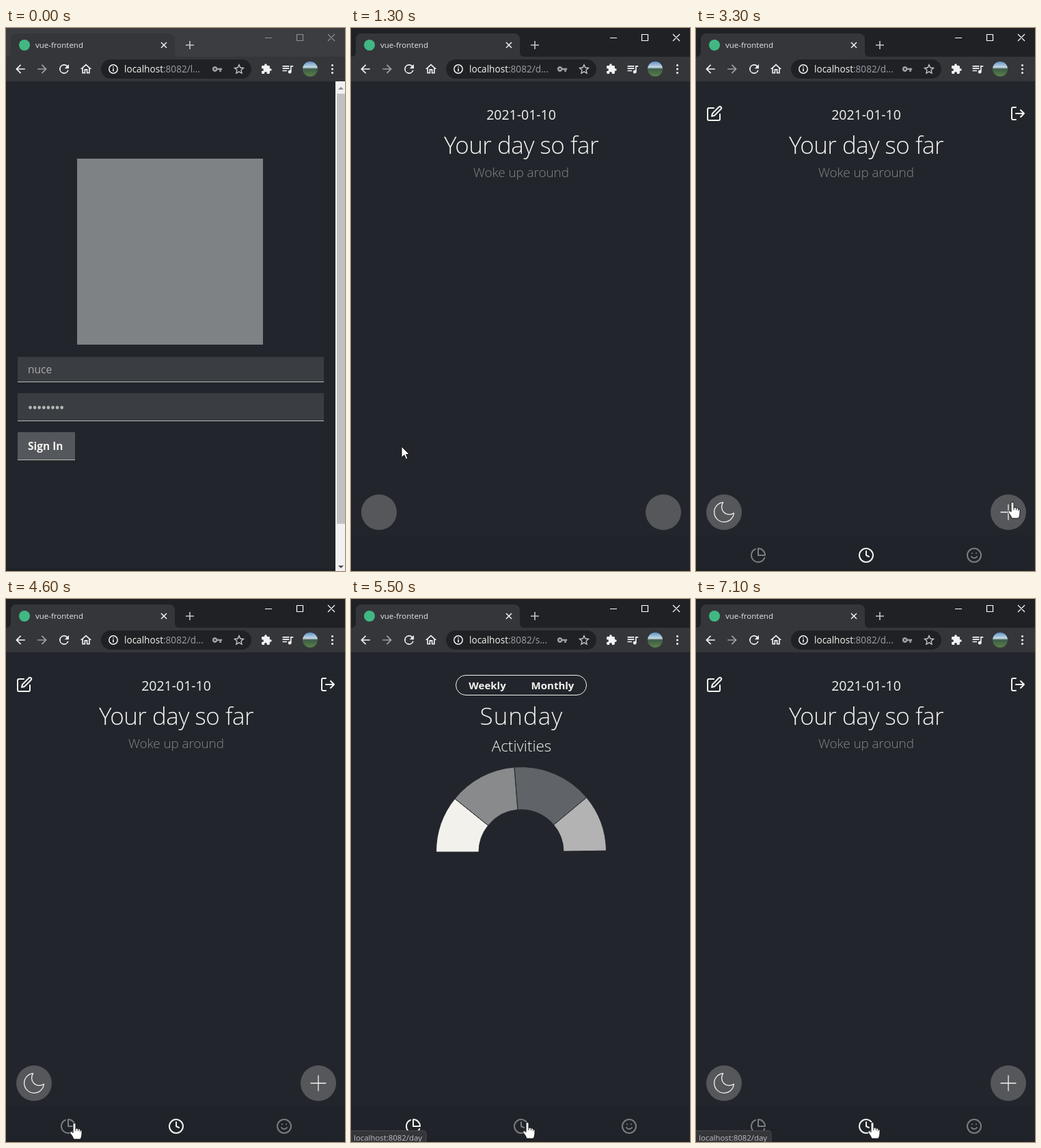
Animation, 496 px wide and 794 px high, one loop 7.2 s. Source, as an HTML page:

```html
<!DOCTYPE html>
<html lang="en">
<head>
<meta charset="utf-8">
<title>vue-frontend</title>
<style>
  html, body { margin: 0; width: 100%; height: 100%; overflow: hidden; background: #22262c; }
  svg { display: block; width: 496px; height: 794px; }
  text { font-family: "Open Sans", "Noto Sans", sans-serif; fill: #f4f4f0; white-space: pre; }
  .mid { text-anchor: middle; }
  .light { font-weight: 300; }
  .bold { font-weight: 700; }
  .line { fill: none; stroke: #f4f4f0; stroke-width: 2; stroke-linecap: round; stroke-linejoin: round; }
  .dim { stroke: #7b7d80; }
  .glyph { fill: #f1f3f4; fill-rule: evenodd; }
  .soft { fill: #9aa0a6; }
  .thin { fill: none; stroke: #f1f3f4; stroke-width: 1.2; }
</style>
</head>
<body>
<svg viewBox="0 0 496 794">
  <defs>
    <linearGradient id="photo" x1="0" y1="0" x2="0" y2="1">
      <stop offset="0" stop-color="#5f93c8"/>
      <stop offset=".38" stop-color="#c4d8e4"/>
      <stop offset=".5" stop-color="#3d5c48"/>
      <stop offset="1" stop-color="#5b8148"/>
    </linearGradient>
  </defs>
  <rect width="496" height="794" fill="#22262c"/>

  <g id="login">
    <rect x="104" y="191" width="272" height="272" fill="#7f8284"/>
    <g fill="#3a3d42">
      <rect x="17" y="481" width="448" height="37"/>
      <rect x="17" y="534" width="448" height="41"/>
    </g>
    <rect x="17" y="591" width="84" height="41" fill="#54575b"/>
    <path d="M17 517.5H465M17 574.5H465M17 631.5H101" stroke="#b9bab6"/>
    <text x="32" y="505" font-size="15.5" style="fill:#abacab">nuce</text>
    <g id="dots" fill="#b4b5b4"></g>
    <text class="bold" x="32" y="617" font-size="15.5">Sign In</text>
    <rect x="482" y="78" width="14" height="716" fill="#f1f1f1"/>
    <rect x="484" y="96" width="12" height="629" fill="#c1c1c1"/>
    <path d="M486 90l4-4 4 4z" fill="#8b8b8b"/>
    <path d="M486 786l4 4 4-4z" fill="#505050"/>
  </g>

  <rect id="footer" y="741" width="496" height="53" fill="#20242a"/>

  <g id="day">
    <text class="mid" x="249" y="134" font-size="19.5">2021-01-10</text>
    <text class="mid light" x="249" y="184" font-size="35" letter-spacing="-.5">Your day so far</text>
    <text class="mid light" x="249" y="218" font-size="19" letter-spacing="-.1" style="fill:#85878a">Woke up around</text>
    <circle cx="41" cy="708" r="26" fill="#55575b"/>
    <circle cx="457" cy="708" r="26" fill="#55575b"/>
    <g id="dayIcons" class="line">
      <path transform="translate(15 113)" d="M11 4H4a2 2 0 0 0-2 2v14a2 2 0 0 0 2 2h14a2 2 0 0 0 2-2v-7M18.5 2.5a2.12 2.12 0 0 1 3 3L12 15l-4 1 1-4z"/>
      <path transform="translate(459 113)" d="M9 21H5a2 2 0 0 1-2-2V5a2 2 0 0 1 2-2h4M16 17l5-5-5-5M21 12H9"/>
      <path transform="translate(21.8 688.8) scale(1.6)" stroke-width=".8" style="stroke-width:.8" d="M21 12.79A9 9 0 1 1 11.21 3 7 7 0 0 0 21 12.79z"/>
      <path style="stroke-width:1.3" d="M446 708H468M457 697V719"/>
    </g>
  </g>

  <g id="stats">
    <rect x="153.5" y="111.5" width="191" height="29" rx="14.5" fill="none" stroke="#f4f4f0"/>
    <text class="mid bold" x="199.5" y="132" font-size="15">Weekly</text>
    <text class="mid bold" x="295" y="132" font-size="15">Monthly</text>
    <text class="mid light" x="249.5" y="184" font-size="35" letter-spacing="1">Sunday</text>
    <text class="mid light" x="249.5" y="223" font-size="22.5">Activities</text>
    <g id="chart" stroke="#22262c"></g>
  </g>

  <g id="nav">
    <path id="pieIcon" class="line" transform="translate(79 759)" d="M21.21 15.89A10 10 0 1 1 8 2.83M22 12A10 10 0 0 0 12 2v10z"/>
    <path id="clockIcon" class="line" transform="translate(237 759)" d="M22 12a10 10 0 1 1-20 0 10 10 0 0 1 20 0zM12 6v6l4 2"/>
    <path class="line dim" transform="translate(395 759)" d="M22 12a10 10 0 1 1-20 0 10 10 0 0 1 20 0zM8 14s1.5 2 4 2 4-2 4-2M9 9h.01M15 9h.01"/>
  </g>
  <rect id="edge" y="790" width="482" height="4" fill="#1e2126"/>

  <g id="status">
    <path d="M-1 795V777.5H106a4 4 0 0 1 4 4V795z" fill="#35363a" stroke="#47484c"/>
    <text x="4" y="792" font-size="11.4" style="fill:#bcbfc2">localhost:8082/day</text>
  </g>

  <g id="browser">
    <rect id="titleBar" width="496" height="43"/>
    <path d="M0 42H1a6 6 0 0 0 6-6V16a8 8 0 0 1 8-8H239a8 8 0 0 1 8 8V36a6 6 0 0 0 6 6H496V78H0z" fill="#35363a"/>
    <circle cx="27" cy="25" r="8" fill="#41b883"/>
    <text x="43" y="29" font-size="11.5" style="fill:#e3e5e8">vue-frontend</text>
    <path class="thin" style="stroke-width:1.5" d="M227 21l8 8M235 21l-8 8"/>
    <path class="thin" style="stroke-width:1.6;stroke:#c4c7ca" d="M263 25H275M269 19V31"/>
    <path id="controls" class="thin" d="M379 14.5H389M425.5 9.5H434.5V18.5H425.5zM471 9l10 10M481 9l-10 10"/>
    <rect x="139" y="46" width="220" height="28" rx="14" fill="#202124"/>
    <circle class="thin" style="stroke-width:1.5" cx="157" cy="60" r="6.2"/>
    <path class="thin" style="stroke-width:1.6" d="M157 59V63.5M157 56.2V57.8"/>
    <text x="173" y="65" font-size="13.6">localhost<tspan id="tail" fill="#9aa0a6" style="fill:#9aa0a6"></tspan></text>
    <path class="thin" style="stroke:#c3c6c9;stroke-width:1.4" d="M341 53.8l1.9 4.2 4.6.5-3.4 3.1.9 4.5-4-2.3-4 2.3.9-4.5-3.4-3.1 4.6-.5z"/>
    <circle cx="445" cy="60" r="11" fill="url(#photo)"/>
    <path d="M477.5 54.5h.01M477.5 60h.01M477.5 65.5h.01" stroke="#f1f3f4" stroke-width="3.2" stroke-linecap="round"/>
  </g>

  <g id="cursor" fill="#fff" stroke="#111" stroke-linejoin="round">
    <path id="arrow" d="M0 0V16L4 12.5 6.5 18.5 9 17.5 6.5 11.5H11.5z"/>
    <g id="hand">
      <path d="M-2 1Q0-1 2 1V8.5Q4 7 5.5 9Q7.5 8 8.5 10Q11 10 11 12.5V17Q11 20 9 24H-1Q-2 20-6 15.5Q-7 13-5 12.5Q-3.5 12.5-2 14.5z"/>
      <path d="M2 8V12M5.5 9V12M8.5 10V13" fill="none" stroke-width=".9"/>
    </g>
  </g>
</svg>
<script>
const LOOP = 7200, STEP = 100;
const $ = id => document.getElementById(id);
const show = (id, on) => { $(id).style.display = on ? "" : "none"; };

function add(parent, tag, attrs) {
  const el = document.createElementNS("http://www.w3.org/2000/svg", tag);
  for (const name in attrs) el.setAttribute(name, attrs[name]);
  return parent.appendChild(el);
}

// Toolbar glyphs on a 24-unit grid: centre x, scale, class, outline
const arrowPath = "M20 11H7.8l5.6-5.6L12 4l-8 8 8 8 1.4-1.4L7.8 13H20z";
[
  [21, .85, "glyph", arrowPath],
  [53, -.85, "glyph soft", arrowPath],
  [85, .87, "glyph", "M17.65 6.35A8 8 0 1 0 19.73 14h-2.08A6 6 0 1 1 12 6c1.66 0 3.14.69 4.22 1.78L13 11h7V4z"],
  [117, .82, "glyph", "M12 5.69l5 4.5V18h-2v-6H9v6H7v-7.81zM12 3L2 12h3v8h6v-6h2v6h6v-8h3z"],
  [309, .65, "glyph soft", "M12.65 10A6 6 0 1 0 12.65 14H17v4h4v-4h2v-4zM7 14a2 2 0 1 1 0-4 2 2 0 0 1 0 4z"],
  [381, .7, "glyph", "M20.5 11H19V7c0-1.1-.9-2-2-2h-4V3.5a2.5 2.5 0 0 0-5 0V5H4c-1.1 0-2 .9-2 2v3.8h1.5a2.7 2.7 0 0 1 0 5.4H2V20c0 1.1.9 2 2 2h3.8v-1.5a2.7 2.7 0 0 1 5.4 0V22H17c1.1 0 2-.9 2-2v-4h1.5a2.5 2.5 0 0 0 0-5z"],
  [412, .82, "glyph", "M15 6H3v2h12zM15 10H3v2h12zM3 16h8v-2H3zM17 6v8.18A3 3 0 1 0 19 17V8h3V6z"]
].forEach(([x, scale, cls, d]) => add($("browser"), "path", {
  class: cls, d, transform: `translate(${x} 60) scale(${scale}) translate(-12 -12)`
}));

for (let i = 0; i < 8; i++) add($("dots"), "circle", { cx: 35.5 + i * 6.6, cy: 555, r: 2.4 });

// Half-ring chart: angles in degrees, clockwise from the left end
const slices = [
  [0, 38.8, "#f2f1ec"], [38.8, 85.4, "#898a8c"], [85.4, 140.2, "#606468"], [140.2, 180, "#b2b3b2"]
].map(([from, to, fill]) => ({ from, to, el: add($("chart"), "path", { fill }) }));

function point(radius, degrees) {
  const a = degrees * Math.PI / 180;
  return `${249 - radius * Math.cos(a)} ${370 - radius * Math.sin(a)}`;
}

function drawChart(sweep) {
  for (const { from, to, el } of slices) {
    const end = Math.min(to, sweep);
    el.setAttribute("d", end <= from ? "" :
      `M${point(124.5, from)}A124.5 124.5 0 0 1 ${point(124.5, end)}` +
      `L${point(62, end)}A62 62 0 0 0 ${point(62, from)}z`);
  }
}

// Pointer stops: time, x, y
const track = [
  [0, 510, 700], [100, 490, 690], [800, 54, 602], [1100, 54, 602], [1300, 74, 612],
  [1600, 74, 612], [2400, 450, 685], [3000, 463, 693], [3400, 463, 693], [4200, 400, 722],
  [4600, 100, 766], [4800, 100, 766], [5400, 258, 765], [LOOP, 258, 765]
];
const handTimes = [[800, 1200], [2400, 3700], [4500, 5000], [5300, LOOP]];

const clamp = v => Math.max(0, Math.min(1, v));

function pointerAt(t) {
  const i = track.findIndex(stop => t < stop[0]);
  const [t0, x0, y0] = track[i - 1], [t1, x1, y1] = track[i];
  const p = (t - t0) / (t1 - t0), ease = p * p * (3 - 2 * p);
  return [x0 + (x1 - x0) * ease, y0 + (y1 - y0) * ease];
}

function pageAt(t) {
  if (t < 1200) return "login";
  return t >= 4900 && t < 6500 ? "stats" : "day";
}

function render(t) {
  const page = pageAt(t), ready = t >= 1400, active = t >= 1000;
  for (const id of ["login", "day", "stats"]) show(id, id === page);
  show("footer", page !== "login");
  show("dayIcons", ready);
  show("nav", ready);
  show("status", t >= 5300);
  $("tail").textContent = `:8082/${page[0]}...`;
  $("titleBar").style.fill = active ? "#202124" : "#3b3d41";
  $("controls").style.stroke = active ? "#fff" : "#8d8f92";
  $("pieIcon").classList.toggle("dim", page !== "stats");
  $("clockIcon").classList.toggle("dim", page !== "day");
  drawChart(180 * Math.sin(clamp((t - 4900) / 640) * Math.PI / 2));

  const hand = handTimes.some(([from, to]) => t >= from && t < to);
  show("hand", hand);
  show("arrow", !hand);
  $("cursor").setAttribute("transform", `translate(${pointerAt(t)})`);
}

function tick() {
  render(Math.floor(performance.now() % LOOP / STEP) * STEP);
  requestAnimationFrame(tick);
}
tick();
</script>
</body>
</html>
```
